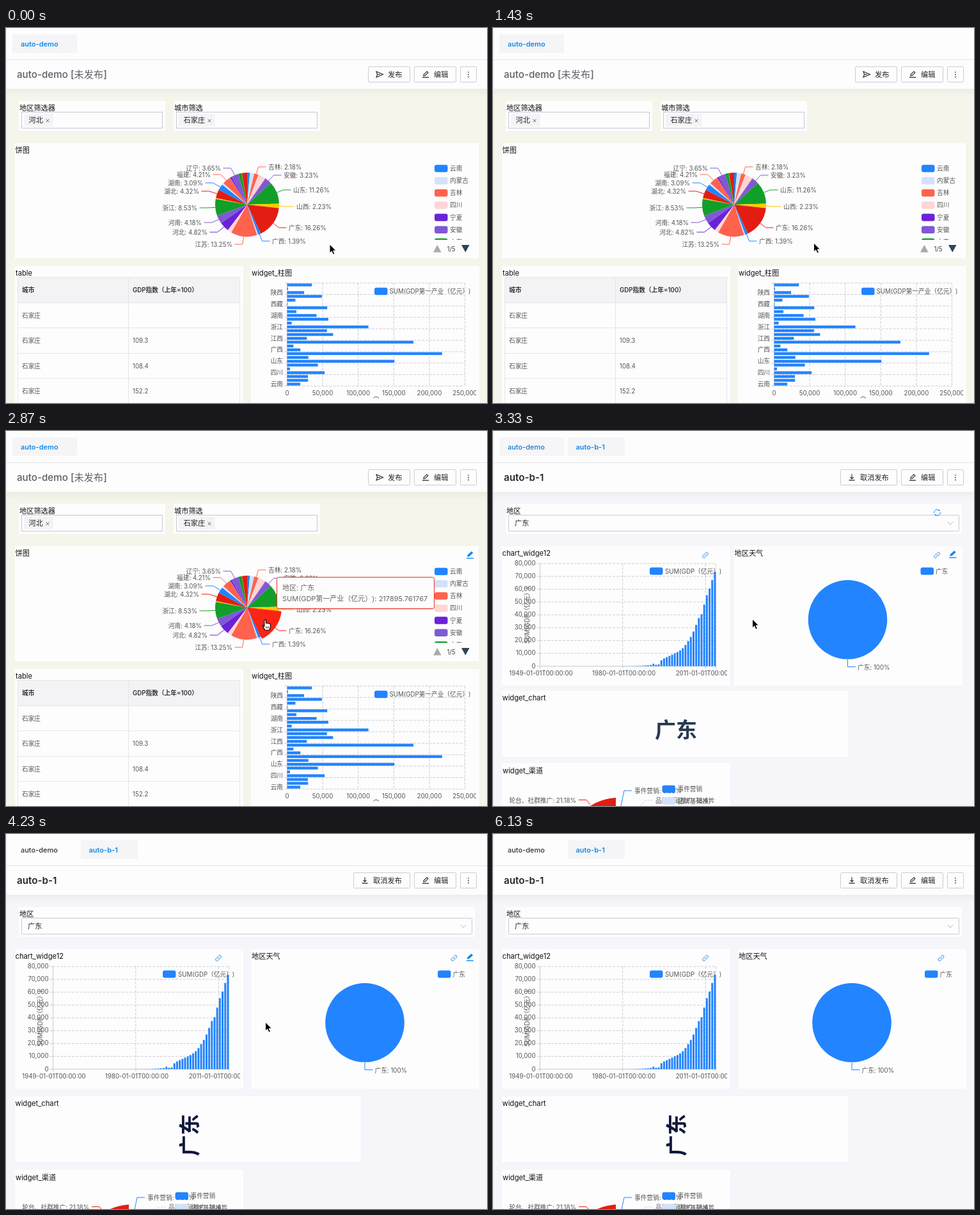
Write an HTML page that moves like this. It is 752 px wide and 586 px high and loops after 6.16 s.

```html
<!DOCTYPE html>
<html lang="zh-CN">
<head>
<meta charset="utf-8">
<title>Dashboard</title>
<style>
html, body { margin: 0; width: 100%; height: 100%; overflow: hidden; background: #fdfdfe; }
svg { display: block; }
text {
  font-family: Inter, 'Noto Sans CJK SC', 'Noto Sans CJK', sans-serif;
  white-space: pre; text-spacing-trim: space-all;
}
</style>
</head>
<body>
<svg id="stage" width="752" height="586" viewBox="0 0 752 586"></svg>
<script>
const LOOP = 6160;
const BLUE = '#2284ff', LINK = '#1389e8', FOCUS = '#3d9ce9', CARD = '#fdfdfe';
const PALETTE = [BLUE, '#d2e2fb', '#ff624d', '#ffd5d5', '#6a22d8', '#7f59d2', '#129f29', '#ffc800', '#e31d12'];
const SMALL = 9.7, BODY = 11.2;

// name and share in percent
const REGIONS = [
  ['云南', 1.38], ['内蒙古', 2.2], ['吉林', 2.18], ['四川', 3.94], ['宁夏', .3], ['安徽', 3.23],
  ['山东', 11.26], ['山西', 2.23], ['广东', 16.26], ['广西', 1.39], ['新疆', .66], ['江苏', 13.25],
  ['江西', 2.07], ['河北', 4.82], ['河南', 4.18], ['浙江', 8.53], ['海南', .48], ['湖北', 4.32],
  ['湖南', 3.09], ['甘肃', .97], ['福建', 4.21], ['西藏', .06], ['贵州', .87], ['辽宁', 3.65],
  ['陕西', 1.78], ['青海', .1], ['黑龙江', 2.6]
];
// region index, label x, label y, side
const PIE_LABELS = [
  [2, 410, 217, 1], [5, 434, 230, 1], [6, 449, 253, 1], [7, 454, 279, 1], [8, 442, 312, 1], [9, 416, 333, 1],
  [23, 336, 219, -1], [20, 320, 229, -1], [18, 308, 242, -1], [17, 302, 255, -1], [15, 299, 281, -1],
  [14, 306, 304, -1], [13, 315, 319, -1], [11, 354, 338, -1]
];
const GROWTH = [1.9, 1.1, 1.4, 4.6, 6, 7, 8, 9, 10, 11, 12.3, 14, 16.5, 19.5, 22.8, 27, 32.2, 37.5, 40.5, 48, 55.3, 60.5, 67.2, 73.4];

const range = n => [...Array(n).keys()];
const each = (n, f) => range(n).map(f).join('');
const rect = (x, y, w, h, fill, more = '') => `<rect x="${x}" y="${y}" width="${w}" height="${h}" fill="${fill}" ${more}/>`;
const path = (d, stroke, more = '') => `<path d="${d}" fill="none" stroke="${stroke}" ${more}/>`;
const shape = (d, fill, more = '') => `<path d="${d}" fill="${fill}" ${more}/>`;
const group = (id, body, more = '') => `<g id="${id}" ${more}>${body}</g>`;
const at = (x, y, body) => `<g transform="translate(${x} ${y})">${body}</g>`;
const clip = (id, x, y, w, h, body) =>
  `<clipPath id="${id}">${rect(x, y, w, h, '#000')}</clipPath><g clip-path="url(#${id})">${body}</g>`;
function text(s, x, y, size = SMALL, fill = '#555', anchor = 'start', more = '') {
  return `<text x="${x}" y="${y + size * .365}" font-size="${size}" fill="${fill}" text-anchor="${anchor}" ${more}>${s}</text>`;
}
const title = (s, x, y) => text(s, x, y, BODY, '#111');
const card = (x, y, w, h) => rect(x, y, w, h, CARD);
const box = (x, y, w, h, stroke = '#c6c6d6', more = '') => rect(x + .5, y + .5, w - 1, h - 1, CARD, `stroke="${stroke}" ${more}`);
const swatch = (x, y, fill) => rect(x, y - 5.75, 20.5, 11.5, fill, 'rx="3"');
const dash = d => path(d, '#ccced4', 'stroke-dasharray="4 2"');
const line = d => path(d, '#c9ccd2');

function slice(cx, cy, r, a, b) {
  const p = t => `${cx + r * Math.sin(t)} ${cy - r * Math.cos(t)}`;
  return `M${cx} ${cy}L${p(a)}A${r} ${r} 0 ${b - a > Math.PI ? 1 : 0} 1 ${p(b)}Z`;
}

const pencil = shape('M-4.5 2.5L-4 -.2 2.3 -6 4.8 -3.6 -1.5 2.2Z', LINK) + rect(-5.5, 4.2, 11, 1.4, LINK);
const linkIcon = `<g transform="rotate(-45)">` +
  path('M1 -2.1H-3.2A2.1 2.1 0 0 0 -3.2 2.1H-1.4M-1 2.1H3.2A2.1 2.1 0 0 0 3.2 -2.1H1.4M-2 0H2', LINK, 'stroke-width=".9"') + '</g>';
const refresh = path('M-4.7 1A4.8 4.8 0 0 1 3 -3.7M4.7 -1A4.8 4.8 0 0 1 -3 3.7', LINK) +
  shape('M2.4 -5L4.6 -2.6 2 -2.4ZM-2.4 5L-4.6 2.6 -2 2.4Z', LINK);

function button(x, w, label, icon) {
  return box(x, 60, w, 25, '#cdcdd2', 'rx="1"') +
    (label ? at(x + 18, 72.5, icon) + text(label, x + 31, 73, BODY, '#222') : icon);
}
const ink = d => path(d, '#222', 'stroke-width="1.1"');
const editButton = button(638, 66, '编辑', ink('M-3.2 2.2L-2.8 0 2 -4.6 3.9 -2.7 -1 2ZM-5 4.6H5'));
const moreButton = button(710, 26, '', each(3, i => `<circle cx="723" cy="${69 + i * 3.7}" r=".85" fill="#222"/>`));
const sendIcon = ink('M-5 -4.5L5.5 0 -5 4.5 -3.4 0ZM-3.4 0H1');
const downIcon = ink('M0 -5V2M-2.6 -.4L0 2.2 2.6 -.4M-4.6 4.4H4.6');

const frame = bg => rect(0, 0, 752, 586, CARD) + rect(0, 95, 752, 491, bg) +
  rect(0, 95, 752, 14, 'url(#shade)') + rect(0, 49, 752, 1, '#e4e4e9') + rect(0, 0, 1, 586, '#ececf0');

function filterBox(x, name, value, tagWidth) {
  return card(x, 114, 229, 47) + title(name, x + 1, 125) + box(x + 4, 131, 221, 26) +
    rect(x + 8, 134, tagWidth, 20, '#f4f4f6') + text(value, x + 15.5, 144, BODY, '#222') +
    path(`M${x + tagWidth - 3.4} 142.4l4.8 4.8m0 -4.8l-4.8 4.8`, '#666');
}

function regionPie() {
  const cx = 377, cy = 276, total = REGIONS.reduce((s, r) => s + r[1], 0);
  let a = 0;
  const arcs = REGIONS.map(r => [a, a += r[1] / total * 2 * Math.PI]);
  const slices = arcs.map(([p, q], i) => shape(slice(cx, cy, 50, p, q), PALETTE[i % 9])).join('');
  const labels = PIE_LABELS.map(([i, x, y, side]) => {
    const m = (arcs[i][0] + arcs[i][1]) / 2, end = x - side * 3.5;
    return path(`M${cx + 50 * Math.sin(m)} ${cy - 50 * Math.cos(m)}L${end - side * 12} ${y}H${end}`, PALETTE[i % 9]) +
      text(`${REGIONS[i][0]}: ${REGIONS[i][1].toFixed(2)}%`, x, y, SMALL, '#555', side > 0 ? 'start' : 'end');
  }).join('');
  const legend = each(7, i => swatch(670, 219.5 + i * 19.15, PALETTE[i]) + text(REGIONS[i][0], 694, 219.5 + i * 19.15));
  return slices + group('hot', shape(slice(cx, cy, 54, ...arcs[8]), '#fb2415')) + labels +
    clip('legendClip', 660, 205, 75, 126, legend) +
    shape('M668 350.5L674.3 339 680.6 350.5Z', '#aaa') + text('1/5', 696, 345, SMALL, '#444', 'middle') +
    shape('M712 339H724.6L718.3 350.5Z', '#2f4554');
}

function table() {
  const rows = ['', '109.3', '108.4', '152.2'];
  const bold = 'font-weight="600"';
  return rect(18, 389, 348, 40, '#f3f3f5') +
    path('M18.5 586V389.5H365.5V586M191.5 389V586M18 429.5H366M18 468.5H366M18 508.5H366M18 547.5H366', '#e6e6ea') +
    text('城市', 25, 409.5, SMALL, '#333', 'start', bold) +
    text('GDP指数（上年=100）', 198, 409.5, SMALL, '#333', 'start', bold) +
    rows.map((v, i) => text('石家庄', 25, 449 + i * 39.5) + text(v, 198, 449 + i * 39.5)).join('');
}

function regionBars() {
  const step = 5.963, bottom = 559.5, px = 14.9;
  const grid = each(10, i => {
    const y = bottom - i * step * 3;
    return dash(`M439.5 ${y}H717`) + line(`M435.5 ${y}h4`);
  }) + each(6, i => dash(`M${439.5 + i * 55.6} 398.5V559.5`) +
    text((i * 50000).toLocaleString('en-US'), 439.5 + i * 55.6, 570.5, SMALL, '#555', 'middle'));
  const bars = REGIONS.map(([name, v], i) => {
    const y = bottom - (i + .5) * step;
    return rect(439.5, y - 2.2, v * px, 4.4, BLUE) + (i % 3 ? '' : text(name, 433, y, SMALL, '#555', 'end'));
  }).join('');
  return clip('barClip', 384, 390, 351, 190, grid + line('M439.5 398.5V559.5') + bars +
    path('M574.5 578.5Q578.5 574 583 578.5', '#555')) +
    swatch(576, 411.5, BLUE) + text('SUM(GDP第一产业（亿元）)', 599.5, 411.5);
}

function yearBars() {
  const step = 276 / 66;
  const grid = each(9, i => {
    const y = 367.5 - i * 20.05;
    return dash(`M73 ${y}H349`) + line(`M69 ${y}h4`) +
      text((i * 10000).toLocaleString('en-US'), 66.5, y - .5, SMALL, '#555', 'end');
  }) + [73.5, 202.8, 332.3, 348.5].map(x => dash(`M${x} 207V367`) + line(`M${x} 367v4`)).join('');
  const value = i => i < 42 ? Math.exp((i - 41) / 4) * .9 : GROWTH[i - 42];
  const bars = each(66, i => {
    const h = value(i) * 2.005;
    return rect(73 + i * step + .6, 367.5 - h, 3, h, BLUE);
  });
  const dates = [1949, 1980, 2011].map((y, i) => text(`${y}-01-01T00:00:00`, 75 + i * 129.6, 378.5, SMALL, '#555', 'middle')).join('');
  return clip('yearClip', 14, 200, 352, 190, grid + line('M73.5 207V367.5H349') + bars + dates +
    `<g transform="translate(53 288) rotate(-90)">${text('SUM(GDP（亿元）)', 0, 0, SMALL, '#555', 'middle')}</g>`) +
    swatch(245, 219, BLUE) + text('SUM(GDP（亿元）)', 269, 219);
}

const tooltip = rect(424, 230, 246, 50, '#000', 'opacity=".1" rx="3"') +
  rect(423.5, 228.5, 246, 49, '#fff', 'fill-opacity=".94" stroke="#e8301f" rx="3"') +
  text('地区: 广东', 432, 245, 11, '#666') +
  text('SUM(GDP第一产业（亿元）): 217895.761767', 432, 261.5, 11, '#666');

const demoPage = frame('#f5f5eb') + rect(10, 10, 101, 29, '#f5f5f8') +
  text('auto-demo', 23, 25, 11, LINK, 'start', 'font-weight="600"') +
  text('auto-demo [未发布]', 17, 72.5, 15.2, '#5d5f66', 'start', 'font-weight="500"') +
  button(566, 66, '发布', sendIcon) + editButton + moreButton +
  filterBox(20, '地区筛选器', '河北', 46) + filterBox(262, '城市筛选', '石家庄', 57) +
  card(14, 180, 725, 180) + title('饼图', 14.5, 191) + regionPie() +
  card(14, 372, 357, 214) + title('table', 15, 383) + table() +
  card(383, 372, 357, 214) + title('widget_柱图', 384, 383) + regionBars() +
  group('hover', at(725.5, 194, pencil) + tooltip);

const weather = card(377, 180, 356.5, 218) + title('地区天气', 377.5, 190.5) +
  swatch(668.5, 219, BLUE) + text('广东', 692, 219) + `<circle cx="554.5" cy="294.8" r="61.8" fill="${BLUE}"/>` +
  path('M554.5 357V368.5H567', BLUE) + text('广东: 100%', 570, 369) +
  at(694, 194, linkIcon) + group('cardEdit', at(718.8, 193, pencil));

const word = (id, fill, place) =>
  group(id, text('广东', 0, 0, 33, fill, 'middle', 'font-weight="700"'), `transform="${place}"`);

const channels = card(14, 519, 357, 80) + title('widget_渠道', 15, 530.5) +
  shape('M192 573Q168 575 152 586V600H192Z', '#e31d12') +
  path('M152 584L146 576.5H134', '#e31d12') + text('轮台、社群推广: 21.18%', 130, 577, SMALL, '#555', 'end') +
  path('M200 586L205 562H217', BLUE) + text('事件营销: 6.53%', 221, 562) +
  path('M231 586L237 577H250', '#d2e2fb') + text('品牌基础推广: 18.4%', 254, 577) +
  swatch(264.5, 559.5, BLUE) + text('事件营销', 288.5, 559.5) +
  swatch(264.5, 578, '#d2e2fb') + text('品牌基础推广', 288.5, 578);

const detailPage = frame('#f5f5fa') + group('oldTab', rect(10, 10, 101, 29, '#f5f5f8')) +
  rect(117, 10, 89, 29, '#f5f5f8') +
  text('auto-demo', 23, 25, 11, '#333', 'start', 'id="tabName" font-weight="500"') +
  text('auto-b-1', 129.5, 25, 11, LINK, 'start', 'font-weight="600"') +
  text('auto-b-1', 17, 72.5, 15.2, '#25262b', 'start', 'font-weight="600"') +
  button(543, 89, '取消发布', downIcon) + editButton + moreButton +
  card(20, 114, 713, 47) + title('地区', 21, 125) + box(24, 131, 705, 26, '#c9c9d3', 'rx="1"') +
  group('arrow', path('M711 142L715 146.5 719 142', '#b4b4ba')) +
  group('focus', at(719, 126.5, pencil) + box(24, 131, 705, 26, FOCUS, 'rx="1"') +
    '<circle cx="715" cy="144" r="5" fill="#b3b3b6"/>' + path('M713.2 142.2l3.6 3.6m0 -3.6l-3.6 3.6', '#fff')) +
  text('广东', 34, 144, BODY, '#222') + group('loading', at(694.5, 127.5, refresh)) +
  card(14, 180, 357, 218) + title('chart_widge12', 14.5, 190.5) + yearBars() + at(332, 194, linkIcon) +
  group('weather', weather) +
  group('wordCard', card(14, 406, 541, 103) + title('widget_chart', 14.5, 417)) +
  word('wordFlat', '#263a50', 'translate(286 467)') + word('wordTurned', '#10183a', 'translate(287 470.5) rotate(-90)') +
  group('channels', channels);

const pointer = shape('M0 0V13.8L3.2 10.8 5.5 16 7.9 15 5.7 9.9H10Z', '#000', 'stroke="#fff" stroke-width="1"');
const hand = shape('M-3.6 -7.3q1.3 -1.5 2.6 0V-2.6q1.5 -1 2.6 .2q1.4 -.8 2.4 .5q1.8 -.5 1.9 1.3V3.6L4.2 8.2H-2.4L-6.3 1.6q.2 -1.9 2.7 .7Z',
  '#fff', 'stroke="#000" stroke-width="1.1" stroke-linejoin="round"') + path('M-.8 2.5V5.5M1.2 2.5V5.5M3.2 2.5V5.5', '#000', 'stroke-width=".8"');

const stage = document.getElementById('stage');
stage.innerHTML = `<defs><linearGradient id="shade" x1="0" y1="0" x2="0" y2="1">
  <stop offset="0" stop-color="#000" stop-opacity=".035"/><stop offset="1" stop-color="#000" stop-opacity="0"/>
  </linearGradient></defs>` +
  group('demo', demoPage) + group('detail', detailPage) + group('pointer', pointer) + group('hand', at(407.5, 303, hand));

const ui = Object.fromEntries([...stage.querySelectorAll('[id]')].map(e => [e.id, e]));
const show = (id, on) => ui[id].setAttribute('display', on ? 'inline' : 'none');
const move = (id, x, y) => ui[id].setAttribute('transform', `translate(${x} ${y})`);

const SWITCH = 3230, SETTLED = 3700;
// time, x, y of the pointer
const TRACK = [
  [0, 506, 338], [1350, 506, 338], [1980, 407.5, 294], [3180, 407.5, 294], [3240, 405.5, 294],
  [4500, 405.5, 294], [5070, 215, 85.5], [5330, 200, 14]
];
const ease = k => k * k * (3 - 2 * k);
const ramp = (t, a, b) => ease(Math.min(1, Math.max(0, (t - a) / (b - a))));

function pointerAt(t) {
  const i = TRACK.findIndex(p => p[0] > t);
  if (i < 0) return TRACK[TRACK.length - 1].slice(1);
  const [a, x, y] = TRACK[i - 1], [b, u, v] = TRACK[i], k = ramp(t, a, b);
  return [x + (u - x) * k, y + (v - y) * k];
}

function render(t) {
  const hover = t >= 2600 && t < SWITCH, detail = t >= SWITCH;
  const focus = t >= 4950 && t < 5200, turned = t >= 3620;
  show('demo', !detail);
  show('detail', detail);
  show('hover', hover);
  show('hot', hover);
  show('hand', hover);
  show('pointer', !hover && t < 5340);
  move('pointer', ...pointerAt(t));

  const s = ramp(t, 3500, SETTLED);
  move('weather', 6.5 * s, 0);
  move('wordCard', 0, 4 * s);
  move('channels', 0, 6 * s);
  show('wordFlat', !turned);
  show('wordTurned', turned);
  show('loading', t < SETTLED);
  show('cardEdit', t < 4620);
  show('focus', focus);
  show('arrow', !focus);

  const fade = ramp(t, SWITCH, SWITCH + 370);
  ui.oldTab.setAttribute('opacity', 1 - fade);
  const mix = (a, b) => Math.round(a + (b - a) * fade);
  ui.tabName.setAttribute('fill', `rgb(${mix(19, 51)},${mix(137, 51)},${mix(232, 56)})`);
}

const start = performance.now();
function tick() {
  render((performance.now() - start) % LOOP);
  requestAnimationFrame(tick);
}
tick();
</script>
</body>
</html>
```
